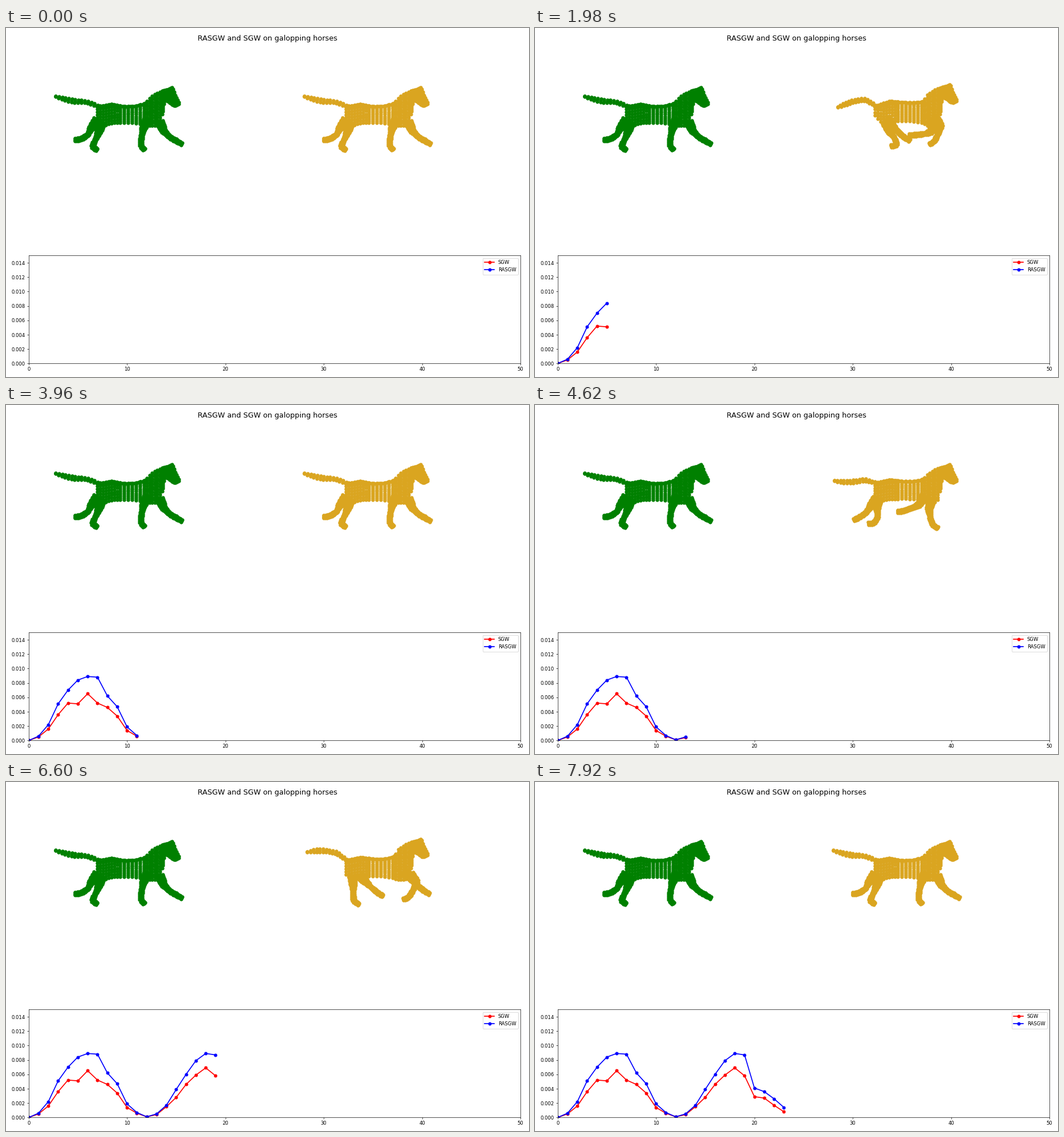
A matplotlib script that plays this animation: 917 by 611 pixels, repeating every 8000 ms.

```python
import numpy as np
import matplotlib.pyplot as plt
from matplotlib.animation import FuncAnimation

W, H, DPI = 917, 611, 917 / 15
LOOP, TICK, STEP = 8000, 40, 330
SHIFT = 436        # distance between the two horses
OMEGA = np.pi / 6  # one stride takes twelve steps
LAG = 2.5          # steps between the two legs of a pair

# Plotted distances, in units of 1e-4
SGW = np.array([0, 5, 16, 36, 52, 51, 65, 52, 46, 34, 14, 6,
                1, 4, 15, 28, 46, 59, 69, 58, 29, 27, 17, 8]) / 1e4
RASGW = np.array([0, 6, 22, 51, 70, 84, 89, 88, 62, 47, 19, 7,
                  1, 5, 17, 39, 60, 79, 89, 87, 41, 36, 26, 14]) / 1e4

# Side view of the body from rump to nose: x, top, bottom
BODY = np.array([
    (596, 137, 168), (606, 136, 172), (622, 134, 167), (646, 138, 166),
    (664, 137, 167), (680, 132, 170), (688, 122, 171), (700, 114, 171),
    (707, 111, 165), (711, 110, 146), (714, 109, 126), (722, 107, 130),
    (728, 104, 135), (733, 118, 136), (739, 130, 133)], float).T

# Each leg segment: length, mean angle, swing, peak of the swing in steps
HIND = [(34, 3, 40, 5.5), (14, 8, 42, 4.9), (14, -4, 54, 5.7), (10, -10, 160, 7.7)]
FORE = [(33, 8, 40, 7.2), (16, -15, 62, 9.1), (15, -15, 75, 9.3), (9, -10, 160, 9.6)]
LEGS = [(HIND, (608, 150), LAG), (HIND, (605, 147), 0),
        (FORE, (690, 145), 0), (FORE, (699, 149), LAG)]
LEG_W = [6, 5, 2.4, 2.8, 2.4]


def wave(p, peak=0):
    return np.cos(OMEGA * (p - peak))


def stride(k):
    """Stride phase; the two strides of the run are slightly uneven."""
    return k + np.sin(OMEGA * k) * (.2 + .7 * np.sin(OMEGA * k / 2))


def limb(joints, pivot, p):
    pts = [np.array(pivot, float)]
    for length, mean, swing, peak in joints:
        a = np.radians(np.clip(mean + swing * wave(p, peak), -85, 60))
        pts.append(pts[-1] + length * np.array([np.sin(a), np.cos(a)]))
    pts[0] = (pts[0] + pts[1]) / 2  # the upper half lies inside the body
    return np.array(pts)


def tail(p):
    t = np.linspace(0, 1, 12)
    x = 596 - (69 + 4 * wave(p)) * t
    sway = t * (3 + 14 * wave(p, 1.2 + 3.2 * t))
    return np.column_stack([x, 136 - 10 * np.minimum(t / .25, 1) + sway])


def outline(p):
    """Body outline with an arching back and a nodding head."""
    x, top, low = BODY.copy()
    arch = 4.5 - 4.5 * wave(p, 10.8)
    nod = 2.9 * wave(p, .8) - 2.7
    trunk = x < 685
    top += np.where(trunk, -arch * np.sin(np.pi * (x - 594) / 100), nod)
    low -= np.where(trunk, arch * np.maximum(.4, 1.8 - (x - 596) / 12), 0)
    low += np.where(x > 712, nod, 0)
    return x, top, low


def tube(pts, widths, rings, across):
    """Rows of dots set square to a bent centre line."""
    s = np.concatenate([[0], np.cumsum(np.hypot(*np.diff(pts, axis=0).T))])
    u = np.linspace(0, s[-1], rings)
    c = np.column_stack([np.interp(u, s, q) for q in pts.T])
    c[1:-1] = (c[:-2] + 2 * c[1:-1] + c[2:]) / 4
    d = np.gradient(c, axis=0)
    n = np.column_stack([-d[:, 1], d[:, 0]]) / np.hypot(*d.T)[:, None]
    w = np.interp(u, np.linspace(0, s[-1], len(widths)), widths)
    off = w[:, None] * np.linspace(-1, 1, across)
    return (c[:, None] + n[:, None] * off[..., None]).reshape(-1, 2)


def columns(start, stop, step, gap, body):
    """Upright rows of dots between the top and the bottom outline."""
    out = []
    for x in np.arange(start, stop, step):
        t, b = (np.interp(x, body[0], edge) for edge in body[1:])
        n = max(2, round((b - t) / gap) + 1)
        out.append(np.column_stack([np.full(n, x), np.linspace(t, b, n)]))
    return np.concatenate(out)


def horse(k):
    p = stride(k)
    body = outline(p)
    back = np.arange(597, 683, 3)
    parts = [
        columns(596, 633, 5, 4.9, body),    # hindquarters
        columns(636, 680, 7, 3, body),      # ribs
        columns(683, 711, 4.5, 4.6, body),  # chest and neck
        columns(711, 740, 2, 3, body),      # head
        np.column_stack([back, np.interp(back, *body[:2]) + .5]),
        tube(tail(p), [1.6, 2.2, 2.6, 2.8, 2.6, .8], 14, 3),
    ]
    parts += [tube(limb(joints, pivot, p - lag), LEG_W, 20, 5)
              for joints, pivot, lag in LEGS]
    return np.concatenate(parts)


fig = plt.figure(figsize=(917.001 / DPI, 611.001 / DPI), dpi=DPI, facecolor="white")
fig.suptitle("RASGW and SGW on galopping horses", fontsize=15)

stage = fig.add_axes([0, 0, 1, 1])
stage.set(xlim=(0, W), ylim=(H, 0))
stage.axis("off")
still = horse(0)
stage.scatter(still[:, 0] - SHIFT, still[:, 1], s=36, lw=1.5, color="green")
runner = stage.scatter(*still.T, s=36, lw=1.5, color="goldenrod")

chart = fig.add_axes([39.7 / W, 1 - 587.4 / H, 862.5 / W, 189 / H])
chart.set(xlim=(0, 50), ylim=(0, .015))
red, = chart.plot([], [], "o-", color="red", lw=2, label="SGW")
blue, = chart.plot([], [], "o-", color="blue", lw=2, label="RASGW")
chart.legend(loc="upper right")


def draw(i):
    k = (i * TICK + TICK - 1) // STEP
    runner.set_offsets(horse(k))
    red.set_data(range(k), SGW[:k])
    blue.set_data(range(k), RASGW[:k])
    return runner, red, blue


def reset():
    return draw(0)


anim = FuncAnimation(fig, draw, frames=LOOP // TICK, init_func=reset,
                     interval=TICK, repeat=True, repeat_delay=0)
plt.show()
```
